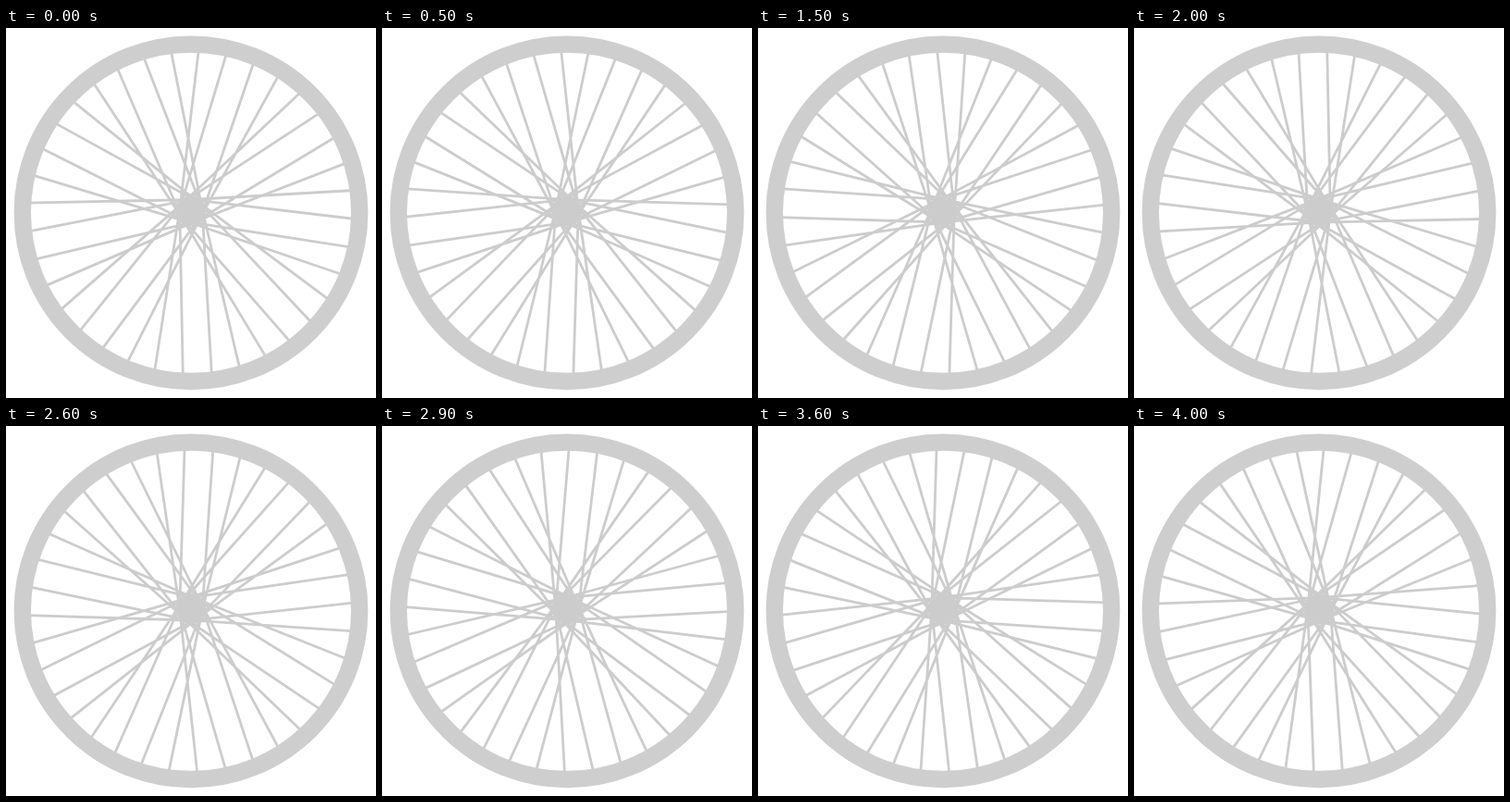
Write an HTML page that moves like this. It is 400x400 px and loops after 4.1 s.

```html
<!DOCTYPE html>
<html lang="en">
<head>
<meta charset="utf-8">
<title>Spinning wheel</title>
<style>
  html, body { margin: 0; width: 100%; height: 100%; overflow: hidden; background: #fff; }
  svg { display: block; width: 100vw; height: 100vh; }
</style>
</head>
<body>
<svg viewBox="0 0 400 400">
  <g transform="translate(200 197.8)">
    <path id="lacing" fill="none" stroke="#ccc" stroke-width="2.8"/>
    <circle r="16.5" fill="#ccc"/>
  </g>
  <circle cx="200" cy="199.8" r="182.2" fill="none" stroke="#cecece" stroke-width="18.4"/>
</svg>
<script>
  const COUNT = 36, HUB = 16, REACH = 178, LEAN = 46, FIRST = 2.8;
  const STEP = 100, LOOP = 4100, HOLD = 23;
  const lacing = document.getElementById('lacing');

  // Clockwise angle in degrees, measured from the top.
  function polar(radius, angle) {
    const a = angle * Math.PI / 180;
    return (radius * Math.sin(a)).toFixed(2) + ' ' + (-radius * Math.cos(a)).toFixed(2);
  }

  // Two spokes lean one way, the next two the other way.
  let path = '';
  for (let i = 0; i < COUNT; i++) {
    const angle = FIRST + i * 360 / COUNT;
    const lean = i % 4 < 2 ? -LEAN : LEAN;
    path += 'M' + polar(HUB, angle + lean) + 'L' + polar(REACH, angle);
  }
  lacing.setAttribute('d', path);

  // One degree per step, with one step held; the lacing repeats every 40 degrees.
  function draw(time) {
    const step = Math.floor(time % LOOP / STEP);
    const turn = step < HOLD ? step : step - 1;
    lacing.setAttribute('transform', 'rotate(' + turn + ')');
  }

  const start = performance.now();
  function tick() {
    draw(performance.now() - start);
    requestAnimationFrame(tick);
  }
  draw(0);
  requestAnimationFrame(tick);
</script>
</body>
</html>
```
